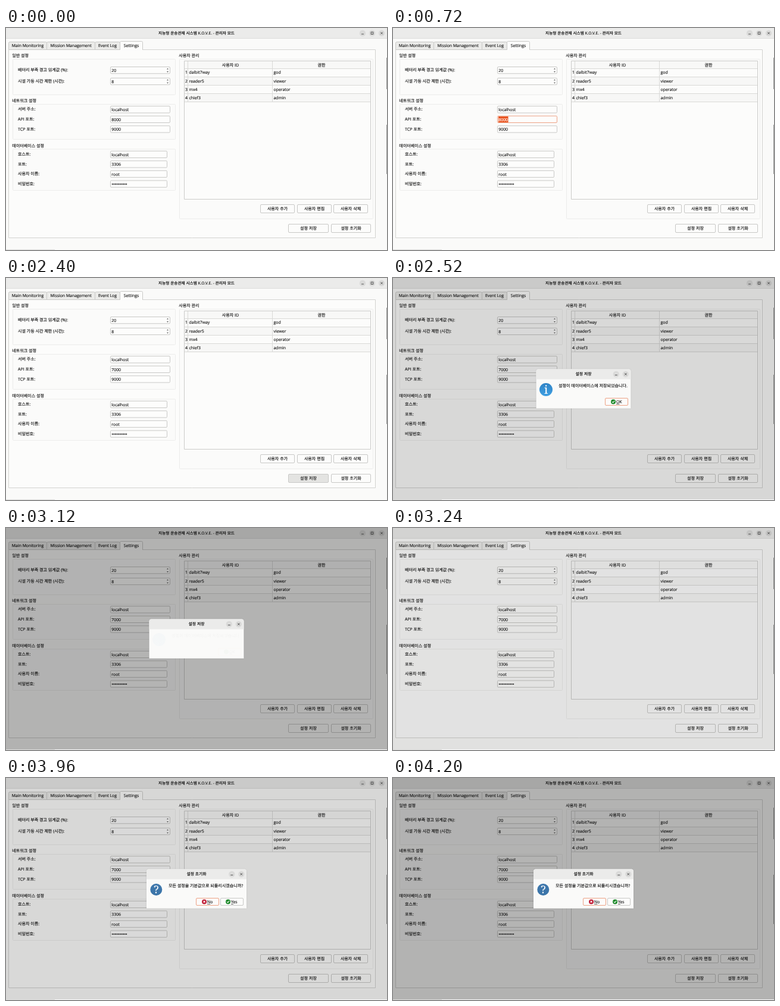
An HTML page with a canvas for the animation above (4.32 s loop, 640 px wide and 374 px high).

```html
<!DOCTYPE html>
<html lang="ko">
<head>
<meta charset="utf-8">
<title>설정</title>
<style>
html, body { margin: 0; width: 100%; height: 100%; overflow: hidden; background: #fafaf9; }
canvas { display: block; width: 640px; height: 374px; }
</style>
</head>
<body>
<canvas id="stage"></canvas>
<script>
const W = 640, H = 374, LOOP = 4320, TICK = 120;
const FONT = '"Open Sans", "Noto Sans CJK KR", "Noto Sans CJK JP", "Noto Sans", sans-serif';
const SERIF = '"Noto Serif", serif';
const INK = '#1c1c1c', LINE = '#c8c8c6', ORANGE = '#eda184';
const canvas = document.getElementById('stage');
const ratio = window.devicePixelRatio || 1;
canvas.width = W * ratio;
canvas.height = H * ratio;
const g = canvas.getContext('2d');
g.scale(ratio, ratio);
g.textRendering = 'geometricPrecision';

function fill(x, y, w, h, color) {
  g.fillStyle = color;
  g.fillRect(x, y, w, h);
}

function box(x0, y0, x1, y1, stroke, color, r = 0) {
  g.beginPath();
  g.roundRect(x0, y0, x1 - x0, y1 - y0, r);
  if (color) { g.fillStyle = color; g.fill(); }
  if (stroke) { g.strokeStyle = stroke; g.lineWidth = 1; g.stroke(); }
}

function path(points, color, width) {
  g.beginPath();
  points.forEach(([x, y], i) => i ? g.lineTo(x, y) : g.moveTo(x, y));
  g.strokeStyle = color;
  g.lineWidth = width;
  g.stroke();
}

function disc(x, y, r, color) {
  g.beginPath();
  g.arc(x, y, r, 0, 7);
  g.fillStyle = color;
  g.fill();
}

// y is the optical middle of the line; a hairline outline thickens the small type
function text(s, x, y, { size, align = 'left', weight = 400, color = INK, family = FONT } = {}) {
  size = size || (/[가-힣]/.test(s) ? 7.05 : 6.9);
  g.font = `${weight} ${size}px ${family}`;
  g.textAlign = align;
  g.fillStyle = g.strokeStyle = color;
  g.lineWidth = 0.16;
  g.fillText(s, x, y + size * 0.35);
  if (weight === 400) g.strokeText(s, x, y + size * 0.35);
  return g.measureText(s).width;
}

const centered = { align: 'center' };

function windowButton(x, y, kind) {
  disc(x, y, 5.2, '#dadad9');
  if (kind === 'min') path([[x - 2, y + 1.5], [x + 2, y + 1.5]], '#444', 0.9);
  if (kind === 'max') {
    g.strokeStyle = '#444';
    g.lineWidth = 0.9;
    g.strokeRect(x - 1.8, y - 1.8, 3.6, 3.6);
  }
  if (kind === 'close') {
    path([[x - 1.8, y - 1.8], [x + 1.8, y + 1.8]], '#444', 0.9);
    path([[x + 1.8, y - 1.8], [x - 1.8, y + 1.8]], '#444', 0.9);
  }
}

function titleBar() {
  fill(0, 0, W, 18, '#ebebea');
  fill(0, 17, W, 1, '#dcdcdb');
  text('지능형 운송관제 시스템 K.O.V.E. - 관리자 모드', 320, 8.6,
    { size: 6.68, weight: 600, align: 'center' });
  windowButton(599, 8.7, 'min');
  windowButton(615, 8.7, 'max');
  windowButton(631, 8.7, 'close');
}

function tab(x0, x1, label, active) {
  const top = active ? 22.5 : 23.5;
  box(x0 + 0.5, top, x1 + 0.5, 36.5, LINE, active ? '#fcfcfb' : '#ebebe9', [2, 2, 0, 0]);
  if (active) fill(x0 + 1, 36, x1 - x0 - 1, 1.5, '#fcfcfb');
  text(label, (x0 + x1) / 2 + 0.5, 30, centered);
}

function group(title, x0, y0, x1, y1) {
  text(title, x0 - 0.7, y0 - 5);
  box(x0 + 0.5, y0 + 0.5, x1 - 0.5, y1 + 0.5, '#ececeb', '#fbfbfa', 1);
}

function field(label, value, y, right, focus) {
  text(label, 20, y - 0.2);
  box(175.5, y - 5.5, right + 0.5, y + 5.8, focus ? ORANGE : LINE, '#fdfdfc', 1.5);
  text(value, 177.3, y + 0.4);
}

function spin(label, value, y) {
  field(label, value, y, 275);
  for (const d of [-1, 1]) {
    const cy = y + 0.2 + d * 2.4;
    g.beginPath();
    g.moveTo(269.9, cy - d * 0.7);
    g.lineTo(273.1, cy - d * 0.7);
    g.lineTo(271.5, cy + d * 1.1);
    g.fillStyle = '#555';
    g.fill();
  }
}

function button(x0, y0, x1, y1, label, pressed) {
  box(x0 + 0.5, y0 + 0.5, x1 + 0.5, y1 + 0.5, LINE, pressed ? '#e4e4e2' : '#fcfcfb', 1.5);
  text(label, (x0 + x1) / 2 + 0.5, (y0 + y1) / 2 + 0.6, centered);
}

function apiField(api) {
  const focus = api.selected || api.caret;
  field('API 포트:', api.selected ? '' : api.value, 153.7, 275, focus);
  const width = g.measureText(api.value).width;
  if (api.selected) {
    fill(177, 149, width + 0.8, 10, '#e95420');
    text(api.value, 177.3, 154.1, { color: '#fff' });
  }
  if (api.caret) fill(177.4 + width, 149.3, 0.8, 9.6, '#222');
}

function table() {
  const rows = [['dalbit7way', 'god'], ['reader5', 'viewer'], ['mx4', 'operator'], ['chief3', 'admin']];
  const top = 68, step = 14.1, grid = '#d9d9d7';
  box(299.5, 55.5, 612.5, 288.5, '#cbcbc9', '#fcfcfb');
  fill(300, 56, 312, 12, '#f8f8f7');
  fill(300, top, 6, step * 4, '#f8f8f7');
  text('사용자 ID', 377, 62.3, centered);
  text('권한', 530, 62.3, centered);
  rows.forEach(([id, role], i) => {
    const y = top + i * step;
    if (i % 2) fill(306, y, 306, step, '#f7f7f6');
    fill(300, Math.round(y), 312, 1, grid);
    text(String(i + 1), 302.9, y + 7, centered);
    text(id, 307.5, y + 7);
    text(role, 449.5, y + 7);
  });
  fill(300, Math.round(top + 4 * step), 312, 1, grid);
  fill(305, 56, 1, 69, grid);
  fill(447, 56, 1, 69, grid);
}

function settings(state) {
  fill(0, 0, W, H, '#fafaf9');
  titleBar();
  box(4.5, 36.5, 620.5, 353.5, '#d2d2d0', '#fcfcfb');
  tab(4, 68, 'Main Monitoring');
  tab(68, 149, 'Mission Management');
  tab(149, 191, 'Event Log');
  tab(191, 229, 'Settings', true);

  group('일반 설정', 11, 52, 285, 112);
  spin('배터리 부족 경고 임계값 (%):', '20', 71);
  spin('시설 가동 시간 제한 (시간):', '8', 89.8);

  group('네트워크 설정', 11, 128, 285, 187);
  field('서버 주소:', 'localhost', 137.2, 275);
  apiField(state.api);
  field('TCP 포트:', '9000', 170.3, 275);

  group('데이터베이스 설정', 11, 203.5, 285, 273);
  field('호스트:', 'localhost', 212.8, 270);
  field('포트:', '3306', 229.3, 270);
  field('사용자 이름:', 'root', 245.8, 270);
  field('비밀번호:', '', 262.5, 270);
  for (let i = 0; i < 10; i++) disc(178.8 + i * 2.6, 263, 1.05, INK);

  group('사용자 관리', 291, 52, 617, 321);
  table();
  button(427, 297, 484, 311, '사용자 추가');
  button(489, 297, 546, 311, '사용자 편집');
  button(550, 297, 607, 311, '사용자 삭제');
  button(474, 330, 541, 344, '설정 저장', state.press === 'save');
  button(546, 330, 612, 344, '설정 초기화', state.press === 'reset');

  fill(639, 50, 1, 53, '#8f8f8e');
  fill(639, 163, 1, 83, '#8f8f8e');
}

function icon(x, y, r, glyph, top, bottom, family) {
  const shade = g.createLinearGradient(0, y - r, 0, y + r);
  shade.addColorStop(0, top);
  shade.addColorStop(1, bottom);
  disc(x, y, r, shade);
  text(glyph, x, y + 0.3, { size: r * 1.75, align: 'center', color: '#fff', family });
}

function dialogButton(x0, x1, label, yes, focus) {
  box(x0 + 0.5, 202.5, x1 + 0.5, 214.5, focus ? ORANGE : LINE, '#fcfcfb', 1.5);
  const width = label === 'Yes' ? 11.5 : 9.5;
  const cx = (x0 + x1) / 2 - width / 2 - 0.2, cy = 208.4;
  disc(cx, cy, 4, yes ? '#1d8a2b' : '#c01c35');
  if (yes) path([[cx - 2, cy], [cx - 0.5, cy + 1.6], [cx + 2.1, cy - 1.6]], '#fff', 1.1);
  else {
    path([[cx - 1.5, cy - 1.5], [cx + 1.5, cy + 1.5]], '#fff', 1.1);
    path([[cx + 1.5, cy - 1.5], [cx - 1.5, cy + 1.5]], '#fff', 1.1);
  }
  text(label, cx + 4.9, cy);
  fill(cx + 5, 212, g.measureText(label[0]).width, 0.7, INK);
}

function dialog(kind, faded) {
  const save = kind === 'save';
  const x0 = save ? 240.5 : 236, x1 = 640 - x0;
  g.save();
  g.shadowColor = 'rgba(0,0,0,.15)';
  g.shadowBlur = 2 * ratio;
  box(x0, 153.5, x1, 219.7, null, '#fafaf9', [4, 4, 0, 0]);
  g.restore();
  box(x0, 153.5, x1, 170.5, null, '#ebebea', [4, 4, 0, 0]);
  text(save ? '설정 저장' : '설정 초기화', 320, 162, { size: 6.8, weight: 600, align: 'center' });
  windowButton(x1 - 24.7, 162, 'min');
  windowButton(x1 - 8.7, 162, 'close');
  g.save();
  if (faded) g.globalAlpha = 0.025;
  if (save) {
    icon(257, 188, 11, 'i', '#2f83c6', '#3f9fe2', SERIF);
    text('설정이 데이터베이스에 저장되었습니다.', 278, 181.8);
    dialogButton(356, 394, 'OK', true, true);
  } else {
    icon(252.3, 188, 10, '?', '#3f78ad', '#3a74a8', SERIF);
    text('모든 설정을 기본값으로 되돌리시겠습니까?', 273, 181.8);
    dialogButton(319, 357, 'No', false, true);
    dialogButton(360, 398, 'Yes', true, false);
  }
  g.restore();
}

// Latest value whose start time has passed
function at(t, keys) {
  let value;
  for (const [start, v] of keys) if (t >= start) value = v;
  return value;
}

const API = [
  [0, { value: '8000' }],
  [360, { value: '8000', selected: true }],
  [1200, { value: '7', caret: true }],
  [1440, { value: '70', caret: true }],
  [1680, { value: '7000', caret: true }],
  [2280, { value: '7000' }]
];
const PRESS = [[0, ''], [2400, 'save'], [2520, ''], [3840, 'reset'], [3960, '']];
const DIALOG = [[0, ''], [2520, 'save'], [3240, ''], [3960, 'reset']];
const DIM = [[0, 0], [2520, 0.14], [2640, 0.29], [3240, 0.1], [3360, 0], [3960, 0.14], [4080, 0.29]];

function draw(now) {
  const t = Math.floor((now % LOOP) / TICK) * TICK;
  settings({ api: at(t, API), press: at(t, PRESS) });
  const dim = at(t, DIM);
  if (dim) fill(0, 0, W, 373, `rgba(0,0,0,${dim})`);
  fill(0, 373, W, 1, '#fdfdfd');
  fill(0, 373, 82, 1, '#dededd');
  const open = at(t, DIALOG);
  if (open) dialog(open, open === 'save' && t >= 3120);
}

const begin = performance.now();
function loop() {
  draw(performance.now() - begin);
  requestAnimationFrame(loop);
}
loop();
</script>
</body>
</html>
```
